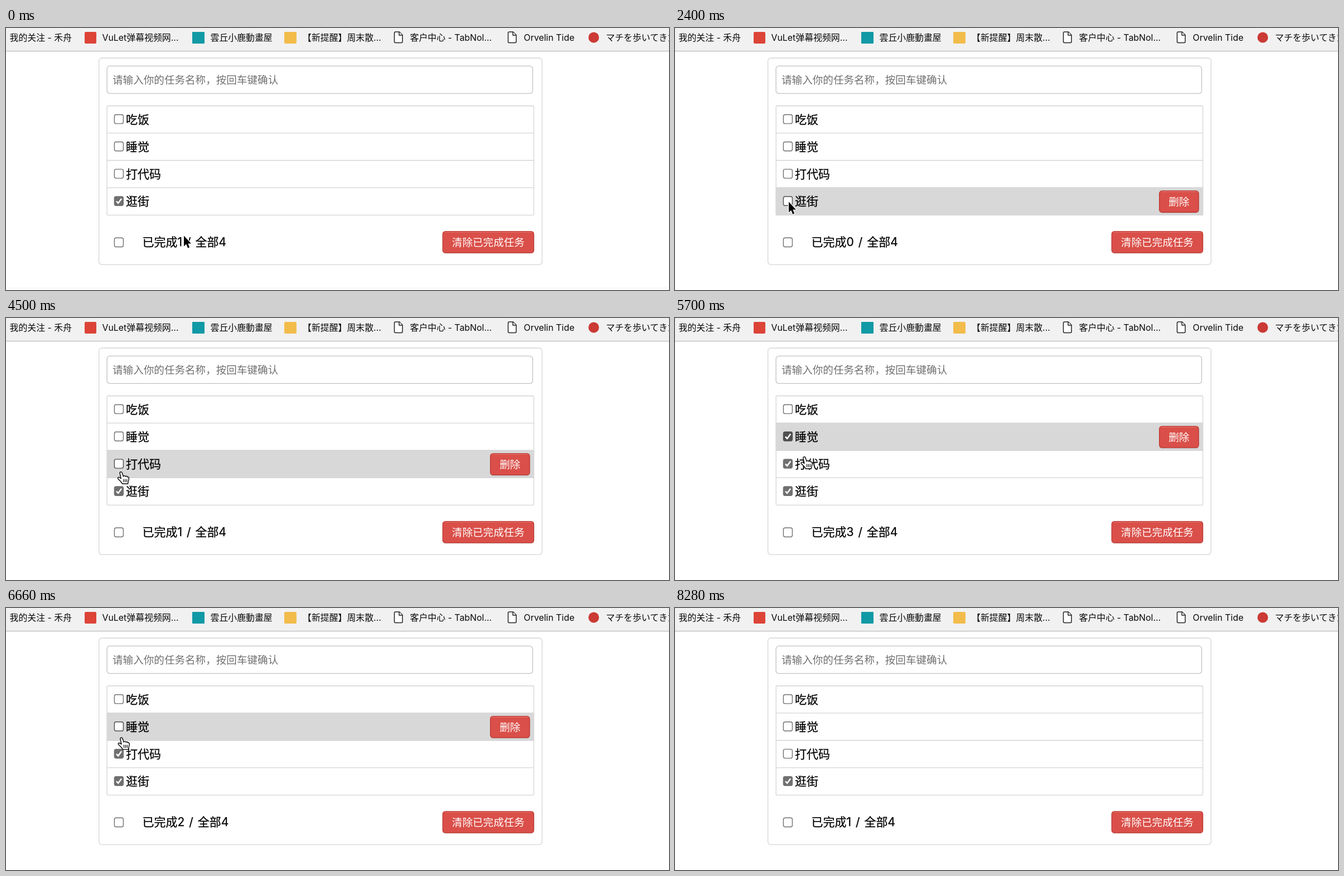
These frames come from a looping animation (1189x471 px, 8.58 s). An HTML page:

```html
<!DOCTYPE html>
<html lang="zh-CN">
<head>
<meta charset="utf-8">
<title>任务列表</title>
<style>
html, body { margin: 0; width: 100%; height: 100%; overflow: hidden; background: #fff; }
svg { display: block; width: 100%; height: 100%; }
text { font-family: "Noto Sans CJK SC", "Noto Sans CJK", sans-serif; font-size: 21px; font-weight: 500;
  fill: #000; white-space: pre; }
.bar text, .count { font-family: Inter, "Noto Sans CJK SC", "Noto Sans CJK", sans-serif; }
.bar text { font-size: 15.9px; font-weight: 400; fill: #0a0a0a; }
.count { font-weight: 400; word-spacing: 2px; }
.row, .count { stroke: #000; stroke-width: .25; }
.bar .tc { font-family: "Noto Sans CJK TC", "Noto Sans CJK", sans-serif; }
.bar .jp { font-family: "Noto Sans CJK JP", "Noto Sans CJK", sans-serif; }
.hint { font-size: 18.58px; font-weight: 400; fill: #707070; }
.btn .shade { fill: #000; opacity: .08; }
.btn .face { fill: #da4f49; stroke: #bd362f; stroke-width: 1.3; }
.btn path { stroke: #e1726d; stroke-width: 1.3; }
.btn text { font-size: 18.58px; fill: #fff; }
.line { fill: none; stroke: #d5d5d5; stroke-width: 1.3; }
.line.field { stroke: #c2c2c2; }
</style>
</head>
<body>
<svg viewBox="0 0 1189 471">
  <g class="bar">
    <rect width="1189" height="41" fill="#f1f1f1"/>
    <rect y="41" width="1189" height="1.2" fill="#b8b8b8"/>
    <text x="6.5" y="23">我的关注 - 禾舟</text>
    <rect x="141" y="7" width="21" height="21" rx="2" fill="#dd4438"/>
    <text x="172.5" y="23">VuLet弹幕视频网...</text>
    <rect x="334" y="7" width="22" height="21" rx="1" fill="#1199a5"/>
    <text class="tc" x="366.5" y="23">雲丘小鹿動畫屋</text>
    <rect x="499" y="7" width="22" height="21" rx="2" fill="#f2bc4b"/>
    <text x="532" y="23">【新提醒】周末散...</text>
    <text x="724.5" y="23">客户中心 - TabNol...</text>
    <text x="928.5" y="23">Orvelin Tide</text>
    <circle cx="1054" cy="17" r="9.5" fill="#cb3a34"/>
    <text class="jp" x="1076" y="23">マチを歩いてきた</text>
    <g id="docs" fill="#fff" stroke="#222" stroke-width="1.5" stroke-linejoin="round"></g>
  </g>
  <rect class="line" x="166.6" y="54" width="794.8" height="371.4" rx="5.5"/>
  <rect class="line field" x="181.1" y="68.4" width="763.4" height="49.3" rx="5"/>
  <text class="hint" x="191" y="99.7">请输入你的任务名称，按回车键确认</text>
  <rect class="line" x="181.2" y="140" width="765.4" height="196.4" rx="1.5"/>
  <g id="list"></g>
  <g id="foot"></g>
  <rect id="edge" y="467" width="1189" height="1" fill="#efefef"/>
  <g id="arrow" stroke-linejoin="round">
    <path d="M1 1.5V20.5L5.2 16.6 8.2 23.6 11.2 22.3 8.3 15.4H14Z" stroke="#fff"
      stroke-width="2.4" paint-order="stroke"/>
  </g>
  <g id="hand" fill="#fff" stroke="#000" stroke-width="1.4" stroke-linejoin="round" stroke-linecap="round">
    <path d="M-2.8 2.6C-3.4 .2 .2-1 1.2 1.6L3.4 8.2C4.6 6.4 7 6.8 7.4 8.4 8.8 7.2 10.6 7.8 10.8 9.4 12.4 8.6 13.6 9.8 13.4 11.6 13.4 15 12 17 11.6 21.5H1.6C.4 18.5-3.6 15-6 12.6-7.6 10.8-5.4 8.8-3.4 10.2L-.8 12Z"/>
    <path d="M3.8 13.5V18M6.7 13.5V18M9.6 13.5V18" stroke-width="1.2"/>
  </g>
</svg>
<script>
const LOOP = 8580, STEP = 60, GONE = 8220, ROW = 49.1, TOP = 139.8, RIGHT = 947.2;
const $ = id => document.getElementById(id);
const show = (el, on) => el.setAttribute('visibility', on ? 'visible' : 'hidden');
const rowAt = y => Math.floor((y - TOP) / ROW);
const boxY = row => 163.8 + ROW * row;
const onLabel = x => x > 190 && x < 282;

function add(parent, tag, attrs, text) {
  const el = document.createElementNS('http://www.w3.org/2000/svg', tag);
  for (const k in attrs) el.setAttribute(k, attrs[k]);
  if (text) el.textContent = text;
  parent.appendChild(el);
  return el;
}

function checkbox(parent, cy) {
  const box = add(parent, 'rect', { x: 194.4, y: cy - 8.1, width: 16, height: 16.2, rx: 3, 'stroke-width': 1.4 });
  const tick = add(parent, 'path', {
    d: `M198 ${cy + .4}l3.2 3.4 6-8.2`, fill: 'none', stroke: '#fff', 'stroke-width': 2.5
  });
  return (on, hot) => {
    const tone = hot ? '#4f4f4f' : '#707070';
    box.setAttribute('fill', on ? tone : '#fff');
    box.setAttribute('stroke', tone);
    show(tick, on);
  };
}

// width follows from the label: glyphs, padding and border
function button(parent, right, y, label) {
  const w = label.length * 18.58 + 34.5, x = right - w;
  const g = add(parent, 'g', { class: 'btn' });
  add(g, 'rect', { class: 'shade', x, y: y + 1.5, width: w, height: 39.8, rx: 5.5 });
  add(g, 'rect', { class: 'face', x: x + .65, y: y + .65, width: w - 1.3, height: 38.5, rx: 4.7 });
  add(g, 'path', { d: `M${x + 4} ${y + 1.9}h${w - 8}` });
  add(g, 'text', { x: x + 17.2, y: y + 26.6 }, label);
  return g;
}

for (const x of [696.5, 900.5]) {
  add($('docs'), 'path', { d: `M${x} 9q0-2 2-2h7l5.5 5.5v12q0 2-2 2h-10.5q-2 0-2-2z` });
  add($('docs'), 'path', { d: `M${x + 8.5} 7v6h6` });
}

const rows = ['吃饭', '睡觉', '打代码', '逛街'].map((name, i) => {
  const list = $('list'), y = TOP + ROW * i;
  if (i) add(list, 'path', { class: 'line', d: `M181 ${y}H947` });
  const fill = add(list, 'rect', { x: 180.6, y: y - .8, width: 766.6, height: 50.4, fill: '#d8d8d8' });
  const check = checkbox(list, boxY(i));
  add(list, 'text', { class: 'row', x: 215, y: boxY(i) + 8.2 }, name);
  return { fill, check, del: button(list, RIGHT - 7.5, y + 5, '删除') };
});

checkbox($('foot'), 385.4)(false, false);
button($('foot'), RIGHT, 365, '清除已完成任务');
const count = add($('foot'), 'text', { class: 'count', x: 244.5, y: 392.4 });

const counter = [318, 372], exit = [330, 490];
const moves = [], clicks = [];
const go = (at, dur, place) => moves.push({ at, dur, place });
const click = (at, row) => clicks.push({ at, row });
const box = row => [203, boxY(row)];

// uncheck the last row, show the counter, check it again
go(420, 480, box(3));
go(1260, 420, counter);
go(1860, 360, box(3));
click(2280, 3);
go(2460, 360, counter);
go(3300, 480, box(3));
click(4080, 3);
// check two more, then undo them
go(4380, 360, box(2));
click(4800, 2);
go(5100, 300, box(1));
click(5520, 1);
go(5675, 300, counter);
go(6000, 300, box(1));
click(6600, 1);
go(6600, 375, box(2));
click(7260, 2);
go(7440, 780, exit);

// each move eases out and bows slightly to the right
function pointer(t) {
  let [x, y] = counter;
  for (const { at, dur, place } of moves) {
    if (t <= at) break;
    const k = 1 - (1 - Math.min(1, (t - at) / dur)) ** 3;
    x += (place[0] - x) * k + 5 * Math.sin(Math.PI * k);
    y += (place[1] - y) * k;
  }
  return [x, y];
}

function draw(time) {
  const t = Math.floor(time / STEP) * STEP;
  const [x, y] = pointer(t);
  const [hx, hy] = pointer(t - STEP / 2); // hover trails the pointer
  const hover = rowAt(hy);

  const done = [false, false, false, true];
  for (const { at, row } of clicks) if (t >= at) done[row] = !done[row];
  rows.forEach((r, i) => {
    show(r.fill, i === hover);
    show(r.del, i === hover);
    r.check(done[i], i === hover && onLabel(hx));
  });
  count.textContent = `已完成${done.filter(Boolean).length} / 全部${rows.length}`;

  const row = rowAt(y);
  const onBox = x < 212 && Math.abs(y - boxY(row)) < 9;
  const pointing = row in rows && onLabel(x) && !onBox;
  for (const id of ['arrow', 'hand']) {
    $(id).setAttribute('transform', `translate(${x} ${y})`);
    show($(id), t < GONE && (id === 'hand') === pointing);
  }
  show($('edge'), t < STEP);
}

function tick() {
  draw(performance.now() % LOOP);
  requestAnimationFrame(tick);
}
tick();
</script>
</body>
</html>
```
